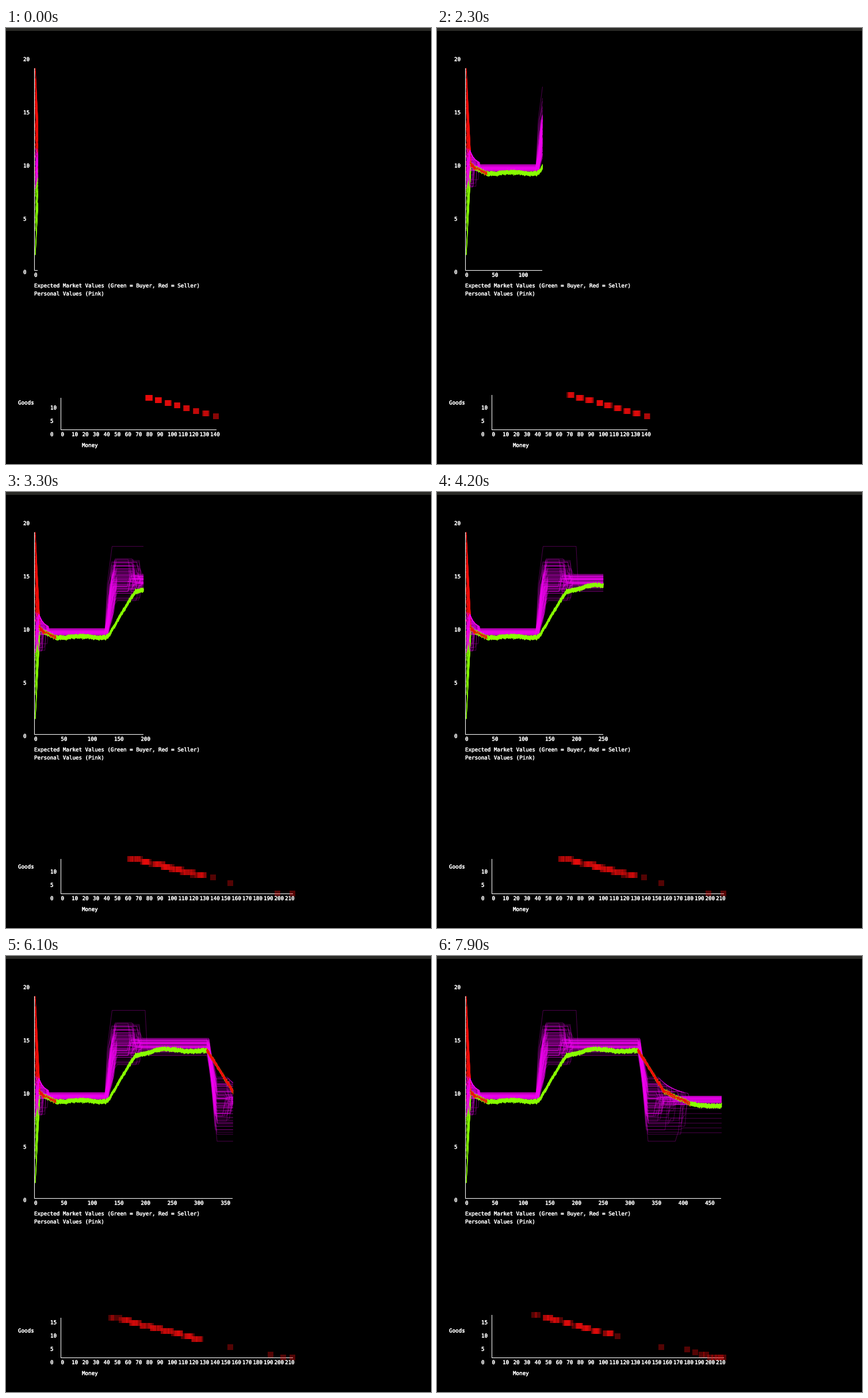
These frames come from a looping animation (739 by 758 pixels, 8000 ms). A matplotlib script:

```python
import numpy as np
import matplotlib.pyplot as plt
from matplotlib.animation import FuncAnimation
from matplotlib.collections import LineCollection
from matplotlib.patches import Rectangle
from matplotlib.patheffects import withStroke

W, H, DPI, FRAMES = 739, 758, 64, 80
PT = 72 / DPI  # points per pixel
WHITE, RED, LIME, PINK = "#f4f4f4", "#f00c08", "#88ff00", "#f400f4"
rng = np.random.default_rng(12)
uni, tri = rng.uniform, rng.triangular

# Upper chart: one tick is 0.927 pixels, six ticks pass per frame
SCALE = 0.927
T = np.arange(490)
X = 50 + SCALE * T
FIRST = 8  # tick at which the expectations have come together


def val_y(v):
    return 421 - 18.5 * v


def lines(ys):
    return np.stack([np.broadcast_to(X[:ys.shape[1]], ys.shape), ys], -1)


def wedge(lo, hi, n):
    """Widely spread first guesses closing in on one price."""
    y0 = np.append(uni(lo, hi, n - 2), [lo, hi])[:, None]
    return lines(238 + (y0 - 238) * (1 - np.clip(T[:11] - 1, 0, 9) / 9))


# Expected market price: a few turning points and a slow wobble
TURNS = np.array([(57, 237), (66, 244), (87, 252), (174, 252), (180, 247),
                  (225, 173), (262, 163), (349, 165), (394, 233),
                  (410, 243), (440, 258), (500, 261)])
K = 26
price = np.interp(X, *TURNS.T)
mid = price - 1.3 * np.cos((X - 130) / 12) + rng.normal(0, 0.6, T.size)
band = lines(mid + uni(-2.5, 2.5, (K, 1)) + rng.normal(0, 1, (K, T.size)))

# Sellers show through the faster the price falls
fall = np.gradient(price, X)
hot = rng.random((K, T.size)) < np.clip(0.75 * (fall - 0.15), 0, 0.9)
hot[:, :FIRST] = False
tick, who = np.nonzero(hot[:, :-1].T)
sell = np.stack([band[who, tick], band[who, tick + 1]], 1)


def agent(i):
    """Personal value over time: plateaus joined by two shocks."""
    s = uni(7.8, 9.2) if uni() < 0.12 else uni(9.3, 11.5)
    p1, p3, p5 = tri(9.2, 9.6, 10), tri(13.2, 14.6, 15.2), uni(8.75, 9.6)
    u2, u4 = tri(12.3, 13.8, 17.2), tri(5.6, 9.8, 12)
    j1, j2, j4 = uni(10, 26), uni(172, 198), uni(352, 415)
    if i < 6:  # a few never recover
        p5 = 6.15 + 0.45 * i
        u4 = p5 - uni(0, 0.6)
    if i == 0:
        u2, j2, u4, j4 = 17.65, 207, 5.35, 393
    a2, a4 = uni(131, 138), uni(322, 328)
    b2, b4 = uni(a2 + 9, 155), uni(337, 343)
    m2, w2 = a2 + uni(0.3, 0.7) * (b2 - a2), p1 + uni(0.3, 0.8) * (u2 - p1)
    ts = [1, 8, j1, j1 + 2, a2, m2, b2, j2, j2 + 4, a4, b4, j4, j4 + 5]
    vs = [uni(7.5, 11.5), s, s, p1, p1, w2, u2, u2, p3, p3, u4, u4, p5]
    y = val_y(np.interp(T, ts, vs))
    # High values are pulled down as the market falls
    roof = np.where(T < 60, 237 - 24 * np.exp(-(T - 8) / 9), 0)
    roof = np.where(X >= 368, 244 - 61 * np.exp(-(X - 368) / 28), roof)
    return np.where(T >= 8, np.maximum(y, roof), y)


pink = lines(np.array([agent(i) for i in range(100)]))

# Lower chart: 60 agents ranked from most goods to most money
N = 60
RANK = (np.arange(N) + 0.5) / N


def state(top, low, bend, slope, spread, rich):
    g = np.round(top - (top - low) * RANK ** bend)
    x = 298 + slope * (9 - g) + uni(-spread, spread, N)
    if rich:
        s = np.linspace(0, 1, rich)
        x[-rich:] = 390 + 108 * s ** 0.4
        g[-rich:] = np.round(4 * (1 - s) ** 3)
    return np.c_[x, g]


start = state(12, 5, 2.4, 16.5, 1.5, 0)
# Each new state is taken up agent by agent between two frames
STEPS = [(state(12, 5, 2, 16.5, 3, 0), 1, 8),
         (state(13, 5, 1.2, 16.5, 3, 0), 20, 23),
         (state(13, 6, 1.2, 18, 10, 3), 25, 32),
         (state(15, 6, 0.95, 18, 8, 4), 54, 61),
         (state(16, 6, 0.9, 18, 7, 9), 62, 68),
         (state(16, 7, 0.9, 18, 7, 10), 69, 72)]
SWITCH = [np.sort(rng.integers(a, b + 1, N)) for _, a, b in STEPS]


def holdings(f):
    pos = start.copy()
    for (new, _, _), when in zip(STEPS, SWITCH):
        moved = f >= when
        pos[moved] = new[moved]
    return pos


POS = [holdings(f) for f in range(FRAMES)]
X_MAX = np.maximum.accumulate([p[:, 0].max() for p in POS])
G_MAX = np.maximum.accumulate([p[:, 1].max() for p in POS])


def goods_y(g):
    return 698 - 4.625 * g


# Stage
fig = plt.figure(figsize=(W / DPI, H / DPI), dpi=DPI, facecolor="black")
ax = fig.add_axes([0, 0, 1, 1])
ax.set(xlim=(0, W), ylim=(H, 0))
ax.axis("off")
ax.add_patch(Rectangle((0, 0), W, 4.5, color="#2b2b27", lw=0))
BOLDER = [withStroke(linewidth=0.45 * PT, foreground=WHITE)]


def text(x, y, s):
    return ax.text(x, y + 3.5, s, color=WHITE, fontsize=9.2 * PT,
                   family="DejaVu Sans Mono", va="baseline", zorder=8,
                   path_effects=BOLDER)


def strokes(color, z, alpha=1):
    return ax.add_collection(LineCollection(
        [], colors=color, linewidths=PT, alpha=alpha, zorder=z),
        autolim=False)


def axis_line():
    return ax.plot([], [], color=WHITE, lw=1.1 * PT, zorder=5)[0]


for v in range(0, 21, 5):
    text(30, val_y(v) + 3, str(v))
text(49, 447.5, "Expected Market Values (Green = Buyer, Red = Seller)")
text(49, 461.5, "Personal Values (Pink)")
text(21, 651, "Goods")
text(132, 725, "Money")
text(77, 706, "0")
ticks = [(x, text(x, 429, str(t)))
         for t in range(0, 500, 50) for x in [49 + SCALE * t]]
money = [(x, text(x - 0.5, 706, str(m)))
         for m in range(0, 230, 10) for x in [96 + 1.855 * m]]
goods = [(g, text(77, goods_y(g) + 8, str(g))) for g in (5, 10, 15)]

layers = [(strokes(RED, 1, 0.9), wedge(70, 258, 50), 0),
          (strokes(LIME, 1, 0.9), wedge(255, 395, 24), 1),
          (strokes(PINK, 2, 0.3), pink, 1),
          (strokes(LIME, 3), band, FIRST)]
sellers = strokes(RED, 4, 0.85)
top_axis, low_axis = axis_line(), axis_line()
squares = ax.scatter([], [], marker="s", s=(9.25 * PT) ** 2, color="#ea0c0c",
                     alpha=0.36, linewidths=0, zorder=6)


def update(f):
    stop = 54 + 6 * SCALE * f
    n = int((stop + 1.5 - X[0]) / SCALE) + 2
    for coll, xy, a in layers:
        coll.set_segments(xy[:, a:n] if n > a + 1 else [])
    sellers.set_segments(sell[:np.searchsorted(tick, n - 1)])
    top_axis.set_data([49.2, 49.2, stop], [69.5, 421, 421])
    right, top = X_MAX[f] - 0.5, G_MAX[f]
    low_axis.set_data([95.2, 95.2, right], [goods_y(top), 698, 698])
    squares.set_offsets(np.c_[POS[f][:, 0], goods_y(POS[f][:, 1])])
    for labels, limit in ((ticks, stop), (money, right), (goods, top)):
        for at, label in labels:
            label.set_visible(at <= limit)
    return []


anim = FuncAnimation(fig, update, frames=FRAMES, interval=100, repeat=True,
                     repeat_delay=0, blit=False)
plt.show()
```
